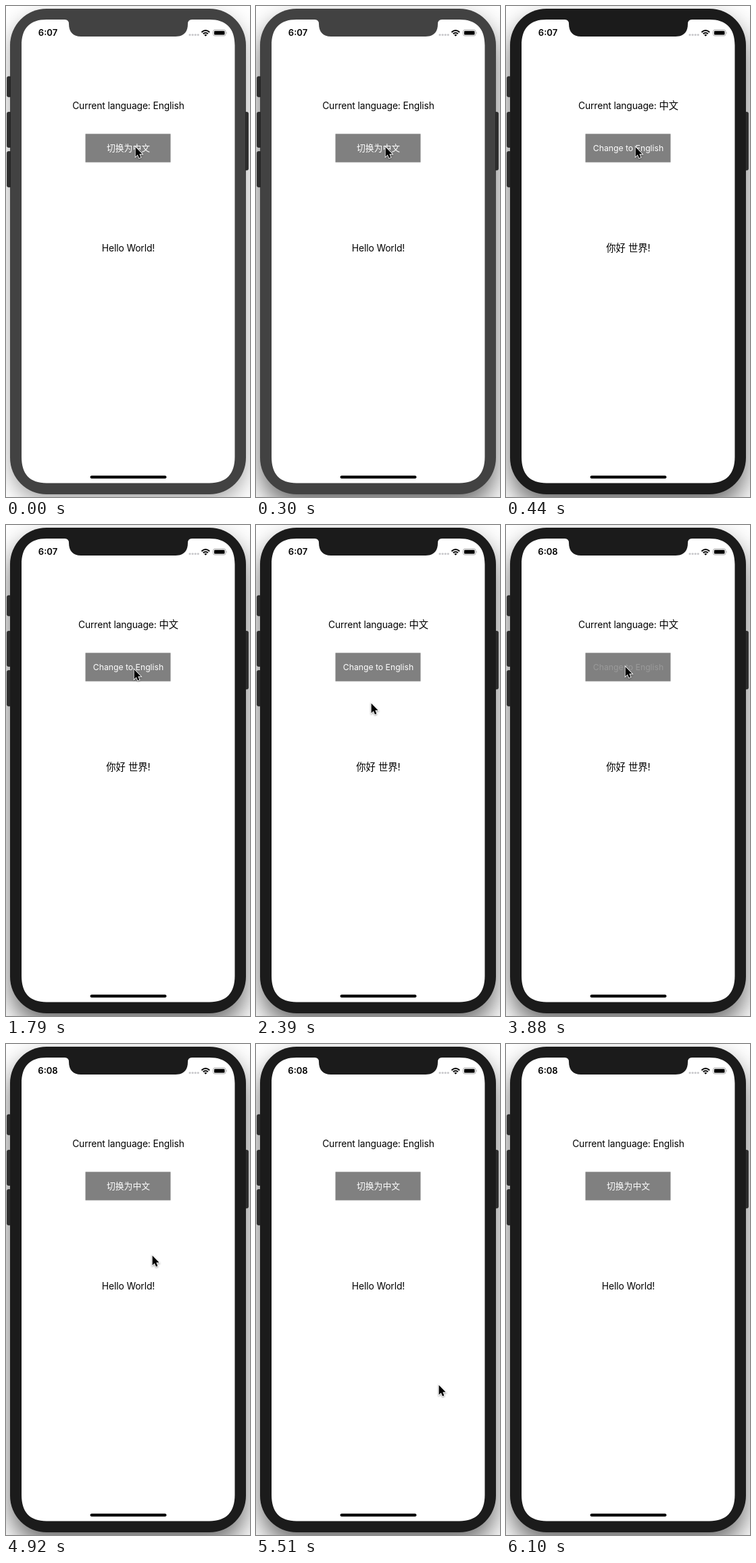
An HTML page for the animation above (6400 ms loop, 361 by 724 pixels).

```html
<!DOCTYPE html>
<html lang="en">
<head>
<meta charset="utf-8">
<title>Language switch</title>
<style>
  html, body { margin: 0; width: 100%; height: 100%; overflow: hidden; background: #fff; }
  .phone, .stage { position: absolute; }
  .phone {
    left: 6px; top: 4px; width: 349px; height: 716px; border-radius: 54px;
    animation: activate 6.4s step-end infinite;
  }
  .stage { left: 0; top: 0; width: 361px; height: 724px; }

  text {
    font-family: Inter, "Noto Sans CJK SC", "Noto Sans CJK", sans-serif;
    font-size: 13.8px; letter-spacing: -.1px; text-anchor: middle;
  }
  .clock { font-size: 13px; font-weight: 600; letter-spacing: 0; }
  .han { font-size: 14.3px; letter-spacing: 0; }
  .title { font-size: 12.2px; letter-spacing: 0; fill: #fff; }
  .title.han { font-size: 12.8px; }

  .en, .zh, .before, .after, .press, .cursor { animation: 6.4s step-end infinite; }
  .en { animation-name: english; }
  .zh { animation-name: chinese; }
  .before { animation-name: before; }
  .after { animation-name: after; }
  .press { animation-name: press; }
  .cursor { animation-name: point; }

  @keyframes activate {
    0% { background: #424242; box-shadow: 0 12px 30px rgba(0,0,0,.34); }
    4.68% { background: #424242; box-shadow: 0 18px 36px rgba(0,0,0,.58); }
    6.87%, 100% { background: #1b1b1b; box-shadow: 0 18px 36px rgba(0,0,0,.58); }
  }
  @keyframes english {
    0% { opacity: 1; }
    6.87% { opacity: 0; }
    62.96%, 100% { opacity: 1; }
  }
  @keyframes chinese {
    0% { opacity: 0; }
    6.87% { opacity: 1; }
    62.96%, 100% { opacity: 0; }
  }
  @keyframes before {
    0% { opacity: 1; }
    51.24%, 100% { opacity: 0; }
  }
  @keyframes after {
    0% { opacity: 0; }
    51.24%, 100% { opacity: 1; }
  }
  @keyframes press {
    0% { opacity: 1; }
    60.62% { opacity: .2; }
    62.96%, 100% { opacity: 1; }
  }
  @keyframes point {
    0% { transform: translate(191px, 207px); }
    27.96% { transform: translate(189px, 212px); }
    30.31% { transform: translate(182px, 231px); }
    32.65% { transform: translate(174px, 254px); }
    34.99% { transform: translate(170px, 266px); }
    37.34% { transform: translate(170px, 262px); }
    39.68% { transform: translate(171px, 243px); }
    42.03% { transform: translate(172px, 222px); }
    44.21% { transform: translate(173px, 209px); }
    46.56% { transform: translate(176px, 208px); }
    69.99% { transform: translate(206px, 280px); }
    72.34% { transform: translate(214px, 312px); }
    76.87% { transform: translate(216px, 311px); }
    79.21% { transform: translate(218px, 318px); }
    81.56% { transform: translate(227px, 352px); }
    83.74% { transform: translate(246px, 420px); }
    86.09% { transform: translate(270px, 502px); }
    88.43% { transform: translate(292px, 584px); }
    90.78% { transform: translate(309px, 656px); }
    92.96% { transform: translate(319px, 700px); opacity: 1; }
    95.31%, 100% { transform: translate(319px, 700px); opacity: 0; }
  }
</style>
</head>
<body>
<div class="phone"></div>
<svg class="stage" viewBox="0 0 361 724">
  <!-- Side buttons -->
  <g fill="#2d2d2d" stroke="#1d1d1d" stroke-width=".7">
    <path d="M6.5 104H3.5Q1.5 104 1.5 106V132Q1.5 134 3.5 134H6.5Z"/>
    <path d="M6.5 156.5H3.5Q1.5 156.5 1.5 158.5V206.5Q1.5 208.5 3.5 208.5H6.5Z"/>
    <path d="M6.5 214.5H3.5Q1.5 214.5 1.5 216.5V265Q1.5 267 3.5 267H6.5Z"/>
    <path d="M354.5 156.5H356.5Q358.5 156.5 358.5 158.5V240Q358.5 242 356.5 242H354.5Z"/>
  </g>

  <!-- Screen with notch -->
  <path fill="#fff" d="M60 20H87Q93 20 93 26.5C93 38 99 45 111 45H251C263 45 269 38 269 26.5Q269 20 275 20H301C326 20 338.500 33 338.500 58V665C338.500 690 326 703.500 301 703.500H60C35 703.500 23 690 23 665V58C23 33 35 20 60 20Z"/>

  <!-- Status bar -->
  <text class="clock before" x="62" y="44">6:07</text>
  <text class="clock after" x="62" y="44">6:08</text>
  <g fill="#c8c8cb">
    <circle cx="272" cy="42.500" r="1.6"/>
    <circle cx="276.100" cy="42.500" r="1.6"/>
    <circle cx="280.200" cy="42.500" r="1.6"/>
    <circle cx="284.200" cy="42.500" r="1.6"/>
  </g>
  <g fill="none" stroke="#000" stroke-width="2">
    <path d="M289.400 38.700Q295.300 33.400 301.200 38.700"/>
    <path d="M291.700 41.100Q295.300 38 298.900 41.100"/>
    <path fill="#000" stroke="none" d="M293.200 42.500Q295.300 40.900 297.400 42.500L295.300 44.700Z"/>
  </g>
  <rect x="306.500" y="35.200" width="18.500" height="8.800" rx="2.500" fill="none" stroke="#a4a4a4" stroke-width=".9"/>
  <rect x="308" y="36.700" width="15.500" height="5.800" rx="1.300"/>
  <path d="M326 38Q327.500 39.500 326 41.200Z" fill="#999"/>

  <!-- App -->
  <rect x="117.500" y="188.500" width="126" height="42" fill="#808080"/>
  <g class="en">
    <text x="181" y="151.500">Current language: English</text>
    <text class="title han" x="181" y="214">切换为中文</text>
    <text x="181" y="362">Hello World!</text>
  </g>
  <g class="zh">
    <text x="181" y="151.500">Current language: <tspan class="han">中文</tspan></text>
    <text class="title press" x="181" y="214">Change to English</text>
    <text class="han" x="181" y="362">你好 世界!</text>
  </g>
  <rect x="124.500" y="692.500" width="113" height="4.300" rx="2.150"/>

  <!-- Pointer -->
  <g class="cursor">
    <path d="M.6 1V15.200L3.800 12.200L6 17.200L8.400 16.200L6.300 11.300H10.600Z"
      stroke="#fff" stroke-width="1.800" paint-order="stroke"
      style="filter: drop-shadow(0 1px .8px rgba(0,0,0,.4))"/>
  </g>
</svg>
</body>
</html>
```
